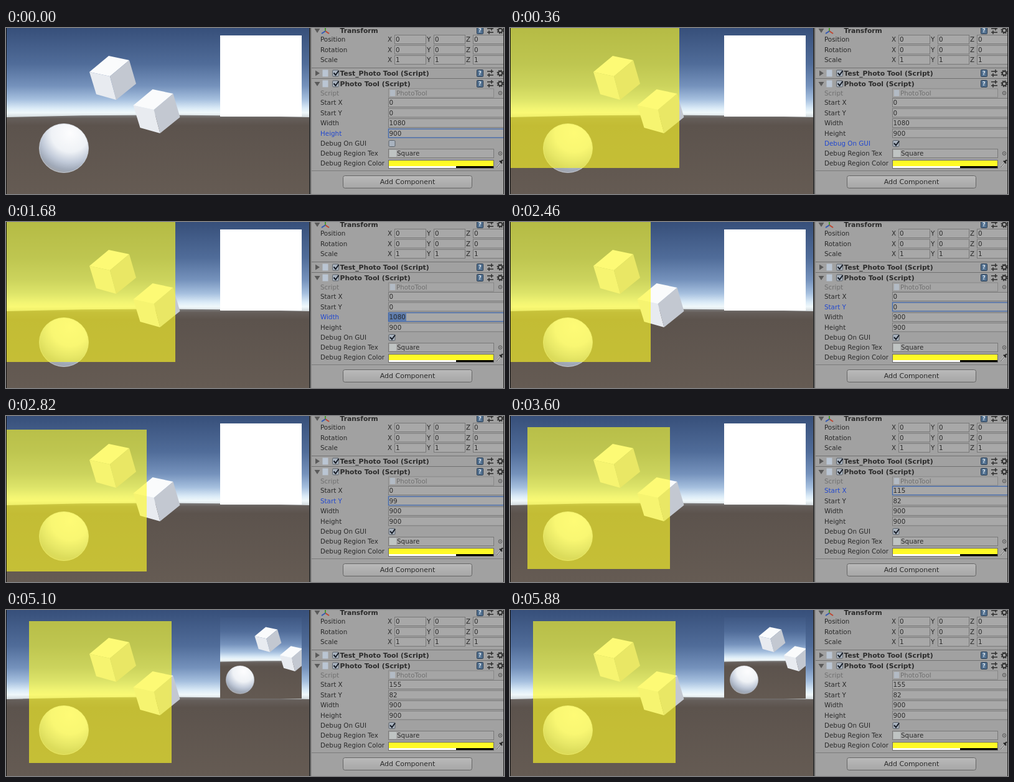
An HTML page for the animation above (5.94 s loop, 800 by 268 pixels).

```html
<!DOCTYPE html>
<html lang="en">
<head>
<meta charset="utf-8">
<title>Photo region inspector</title>
<style>
html, body { margin: 0; width: 100%; height: 100%; overflow: hidden; background: #a1a1a1; }
svg { display: block; }
text { font: 10.35px "DejaVu Sans", sans-serif; fill: #2a2a2a; white-space: pre; }
.bold { font-weight: bold; font-size: 10.75px; }
.dim { fill: #707070; }
.active { fill: #2248cf; }
.box { fill: #a8a8a8; stroke: #787878; }
.box.active { fill: #a8a8a8; stroke: #3f67ad; stroke-width: 1.3; }
.btn { font-size: 11px; }
</style>
</head>
<body>
<svg id="stage" width="800" height="268" viewBox="0 0 800 268">
  <defs>
    <linearGradient id="sky" x1="0" y1="0" x2="0" y2="144" gradientUnits="userSpaceOnUse">
      <stop offset="0" stop-color="#374f7a"/>
      <stop offset=".4" stop-color="#506c99"/>
      <stop offset=".65" stop-color="#7592bc"/>
      <stop offset=".8" stop-color="#a5bfde"/>
      <stop offset=".9" stop-color="#dbebf7"/>
      <stop offset=".95" stop-color="#f0f8fb"/>
      <stop offset="1" stop-color="#d3dadd"/>
    </linearGradient>
    <linearGradient id="ground" x1="0" y1="138" x2="0" y2="268" gradientUnits="userSpaceOnUse">
      <stop offset="0" stop-color="#8c8f92"/>
      <stop offset=".06" stop-color="#655e5a"/>
      <stop offset=".15" stop-color="#5c534d"/>
      <stop offset="1" stop-color="#655b53"/>
    </linearGradient>
    <radialGradient id="ball" cx="103" cy="170" r="72" gradientUnits="userSpaceOnUse">
      <stop offset="0" stop-color="#fdfdfe"/>
      <stop offset=".42" stop-color="#eff2f6"/>
      <stop offset=".66" stop-color="#c0c9d8"/>
      <stop offset=".82" stop-color="#a0a9b8"/>
      <stop offset="1" stop-color="#a19d9c"/>
    </radialGradient>
    <linearGradient id="button" x1="0" y1="0" x2="0" y2="1">
      <stop offset="0" stop-color="#bababa"/>
      <stop offset="1" stop-color="#a6a6a6"/>
    </linearGradient>
    <g id="cube">
      <path d="M0 26 31 0 64 7 33 33Z" fill="#fafbfc"/>
      <path d="M0 26 33 33 43 71 11 62Z" fill="#e8ebf0"/>
      <path d="M33 33 64 7 75 45 43 71Z" fill="#c3c8d1"/>
    </g>
    <g id="scene">
      <rect width="488" height="268" fill="url(#sky)"/>
      <path d="M0 144Q244 137 488 144V268H0Z" fill="url(#ground)"/>
      <use href="#cube" x="134" y="45"/>
      <use href="#cube" x="204.500" y="99"/>
      <circle cx="93" cy="194" r="39.500" fill="url(#ball)" stroke="#d3dae2" stroke-width=".8"/>
    </g>
    <clipPath id="view"><rect x="1" width="486" height="268"/></clipPath>
  </defs>

  <g clip-path="url(#view)">
    <use href="#scene"/>
    <rect x="344" y="12" width="131" height="131" fill="#fff"/>
    <svg id="photo" x="344" y="12" width="131" height="131" viewBox="37 18 229 229"><use href="#scene"/></svg>
    <rect id="region" fill="#fffa26" fill-opacity=".63" shape-rendering="crispEdges"/>
  </g>
  <path d="M.5 0V268" stroke="#0b0b0b"/>
  <rect x="487" width="313" height="268" fill="#a1a1a1"/>
  <rect x="487" width="4" height="268" fill="#858585"/>
  <rect x="487" width="2" height="268" fill="#333"/>
  <g id="panel"></g>
  <path d="M799.500 0V268" stroke="#222"/>
</svg>
<script>
const NS = 'http://www.w3.org/2000/svg';
const LOOP = 5940, STEP = 60;
const SCALE = 0.2544, OFFSET_X = -2.5, OFFSET_Y = -3;
const panel = document.getElementById('panel');
const region = document.getElementById('region');
const photo = document.getElementById('photo');

function add(tag, attrs, content) {
  const el = document.createElementNS(NS, tag);
  for (const key in attrs) el.setAttribute(key, attrs[key]);
  if (content !== undefined) el.textContent = content;
  return panel.appendChild(el);
}
const text = (x, mid, s, cls = '') => add('text', { x, y: mid + 3.8, class: cls }, s);
const line = (d, stroke = '#1c1c1c', width = 1) =>
  add('path', { d, stroke, 'stroke-width': width, fill: 'none' });
const rect = (x, y, width, height, fill, more) => add('rect', { x, y, width, height, fill, ...more });
const box = (x, mid, width) =>
  add('rect', { x: x + .5, y: mid - 7, width: width - 1, height: 14, class: 'box' });

function checkbox(x, mid) {
  rect(x + .5, mid - 4.5, 10, 10, '#a9b3bf', { stroke: '#5b6168', rx: 1.5 });
  return line(`M${x + 2.5} ${mid}l3 3.500 5-7`, '#161c26', 2);
}

function picker(mid) {
  add('circle', { cx: 794, cy: mid, r: 2.8, fill: 'none', stroke: '#555' });
  add('circle', { cx: 794, cy: mid, r: .8, fill: '#444' });
}

function headerIcons(mid) {
  rect(756.500, mid - 5.5, 10, 11, '#52708f', { stroke: '#273a50', rx: 1 });
  add('text', { x: 759, y: mid + 3, style: 'font-size:8px;font-weight:bold;fill:#e4ebf2' }, '?');
  line(`M773 ${mid - 3}h10M773 ${mid + 3}h10M780 ${mid - 6}v6M776 ${mid}v6`, '#2b2b2b', 1.4);
  add('circle', { cx: 794, cy: mid, r: 3.2, fill: 'none', stroke: '#303030', 'stroke-width': 2 });
  add('circle', { cx: 794, cy: mid, r: 4.8, fill: 'none', stroke: '#303030',
    'stroke-width': 1.5, 'stroke-dasharray': '1.9 1.87' });
}

function header(mid, title, open) {
  const d = open ? `M495.500 ${mid - 3}h9l-4.500 7z` : `M497 ${mid - 4.5}v9l7-4.500z`;
  add('path', { d, fill: '#5a5a5a' });
  headerIcons(mid);
  return text(536.500, mid, title, 'bold');
}

// Transform
header(4, 'Transform', true);
line('M513 5V-2', '#4b9b32', 2);
line('M513 5l6 4', '#c0442f', 2);
line('M513 5l-6 4', '#3159b3', 2);
[['Position', 18.500, 0], ['Rotation', 35, 0], ['Scale', 51.500, 1]].forEach(([name, mid, value]) => {
  text(505, mid, name);
  ['X', 'Y', 'Z'].forEach((axis, i) => {
    const x = 613 + i * 63;
    text(x, mid, axis);
    box(x + 11, mid, i < 2 ? 51 : 50);
    text(x + 13, mid, value);
  });
});

// Script components
line('M491 64.500H800M491 81.500H800', '#717171');
[[73, 'Test_Photo Tool (Script)', false], [90, 'Photo Tool (Script)', true]].forEach(([mid, name, open]) => {
  header(mid, name, open);
  rect(508.500, mid - 5.5, 9, 11, '#bac5d3');
  checkbox(524, mid - .5);
});

text(505, 105, 'Script', 'dim');
box(614, 105, 170).setAttribute('opacity', .6);
rect(617, 100, 8, 10, '#b2bac4');
text(627, 105, 'PhotoTool', 'dim');
picker(105);

const selection = rect(615, 147.500, 28, 12.5, '#5d7cae');
selection.remove();

function numberRow(mid, name) {
  const label = text(505, mid, name);
  const frame = box(614, mid, 186);
  if (name === 'Width') panel.appendChild(selection);
  return { label, frame, value: text(615.500, mid, '') };
}
const rows = {
  x: numberRow(120.500, 'Start X'),
  y: numberRow(137, 'Start Y'),
  w: numberRow(153.500, 'Width'),
  h: numberRow(170, 'Height'),
  debug: { label: text(505, 186, 'Debug On GUI') }
};
const tick = checkbox(614.500, 186);

text(505, 202.500, 'Debug Region Tex');
box(614, 202.500, 170);
rect(616, 197, 11, 11, '#bfc4c3');
text(628, 202.500, 'Square');
picker(202.500);

text(505, 218.500, 'Debug Region Color');
rect(614, 213, 170, 14, '#6b6b6b');
rect(615, 214, 168, 9, '#fffa26');
rect(615, 223, 108, 3, '#fff');
rect(723, 223, 60, 3, '#000');
line('M789 224l5-6', '#d8d8d8', 2.5);
line('M788.500 224.500l6-7', '#383838', 1);
line('M793 214.500l4 4M794 217l4-4', '#222', 2.2);

line('M491 230.500H800', '#7b7b7b');
rect(541.500, 238.500, 207, 20, 'url(#button)', { stroke: '#656565', rx: 3 });
text(645, 248, 'Add Component', 'btn').setAttribute('text-anchor', 'middle');

// Timeline
function tween(t, keys) {
  if (t <= keys[0][0]) return keys[0][1];
  for (let i = 1; i < keys.length; i++) {
    const [t0, v0] = keys[i - 1], [t1, v1] = keys[i];
    if (t <= t1) return v0 + (v1 - v0) * (t - t0) / (t1 - t0);
  }
  return keys[keys.length - 1][1];
}
function hold(t, keys) {
  let value;
  for (const [start, v] of keys) if (t >= start) value = v;
  return value;
}
const startX = t => Math.round(tween(t, [[3420, 0], [3540, 115], [3600, 120], [3900, 155]]));
const startY = t => Math.round(tween(t, [[2520, 0], [2760, 99], [2880, 99], [3180, 82]]));
const widthAt = t => hold(t, [[0, 1080], [1740, 9], [1800, 90], [1860, 900]]);
const focusAt = t => hold(t, [[0, 'h'], [180, 'debug'], [1320, 'w'], [2460, 'y'], [3360, 'x'], [4620, '']]);

const show = (el, on) => el.setAttribute('visibility', on ? 'visible' : 'hidden');

function draw(now) {
  const t = Math.floor(now % LOOP / STEP) * STEP;
  const debug = t >= 180, focus = focusAt(t);
  const w = widthAt(t), h = 900;
  // The fields repaint one step after the game view.
  const shown = { x: startX(t - STEP), y: startY(t - STEP), w, h };

  for (const key in rows) {
    const { label, frame, value } = rows[key];
    label.classList.toggle('active', key === focus);
    if (!frame) continue;
    frame.classList.toggle('active', key === focus);
    value.textContent = shown[key];
  }
  show(selection, focus === 'w' && t < 1740);
  show(tick, debug);
  show(region, debug);
  show(photo, t >= 4860);

  region.setAttribute('x', OFFSET_X + startX(t) * SCALE);
  region.setAttribute('y', OFFSET_Y + startY(t) * SCALE);
  region.setAttribute('width', w * SCALE);
  region.setAttribute('height', h * SCALE);
}

function loop() {
  draw(performance.now() - began);
  requestAnimationFrame(loop);
}
const began = performance.now();
loop();
</script>
</body>
</html>
```
